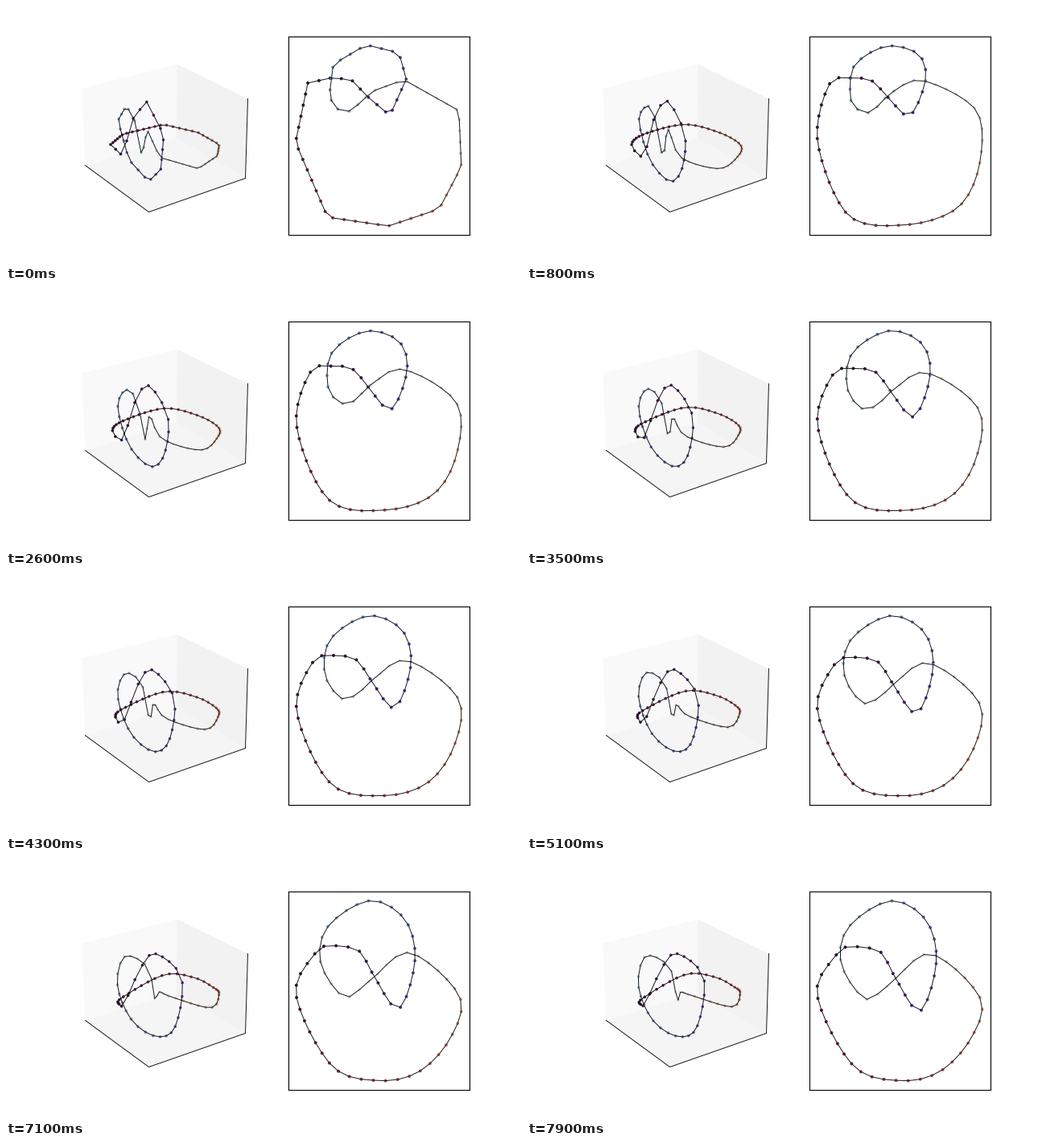
Recreate the animation shown at these times as a matplotlib script. Size 640 by 320 pixels, loop 8 s.

```python
import matplotlib.pyplot as plt
import numpy as np
from matplotlib.animation import FuncAnimation
from matplotlib.patches import Polygon

W, H, DPI = 640, 320, 100
FRAMES, STEP = 80, 100
N = 69  # knot vertices
PX = 72 / DPI
INK = "#1a1a1a"

# Key points of the knot: plan x, plan y, height on the box view
LOOSE = np.array([
    (376, 97, 172), (408, 90, 186), (430, 94, 140), (449, 114, 118),
    (476, 137, 160), (496, 92, 203), (487, 60, 218), (447, 50, 191),
    (407, 74, 142), (402, 114, 124), (411, 129, 138), (428, 132, 187),
    (455, 107, 153), (493, 93, 188), (560, 131, 202), (563, 200, 186),
    (536, 252, 172), (474, 273, 157), (400, 262, 147), (361, 170, 159),
], float)
ROUND = np.array([
    (385, 117, 178), (402, 107, 176), (440, 113, 130), (457, 141, 115),
    (490, 187, 145), (511, 126, 206), (498, 74, 218), (454, 50, 198),
    (401, 82, 155), (391, 127, 118), (420, 171, 132), (444, 160, 173),
    (460, 146, 163), (505, 116, 167), (566, 170, 181), (555, 220, 164),
    (515, 262, 156), (464, 273, 144), (406, 254, 141), (361, 167, 170),
], float)


def trace(keys, smooth, steps=12):
    """Closed curve from straight (0) to Catmull-Rom (1) spans."""
    a, b, c, d = (np.roll(keys, s, axis=0)[:, None] for s in (1, 0, -1, -2))
    u = np.linspace(0, 1, steps, endpoint=False)[None, :, None]
    line = b + (c - b) * u
    curve = 0.5 * (2 * b + (c - a) * u + (2 * a - 5 * b + 4 * c - d) * u**2
                   + (3 * b - a - 3 * c + d) * u**3)
    return (line + (curve - line) * smooth).reshape(-1, 3)


def resample(path):
    """Vertices at equal distances along the plan, closed."""
    path = np.vstack([path, path[:1]])
    dist = np.r_[0, np.cumsum(np.hypot(*np.diff(path[:, :2], axis=0).T))]
    at = np.linspace(0, dist[-1], N + 1)
    return np.column_stack([np.interp(at, dist, col) for col in path.T])


def knot_at(t):
    smooth = 1 - np.exp(-t / 0.3)
    late = np.clip((t - 1.6) / 6.3, 0, 1)
    relax = 1 - (1 - late)**1.4
    return resample(trace(LOOSE + (ROUND - LOOSE) * relax, smooth))


def box_view(p):
    x, y, h = p.T
    return np.column_stack([197 + 0.533 * (x - 463.5) + 0.321 * (y - 162), h])


fig = plt.figure(figsize=(W / DPI, H / DPI), dpi=DPI, facecolor="white")
box = fig.add_axes([0, 0, 1, 1])
box.set(xlim=(-0.5, W - 0.5), ylim=(H - 0.5, -0.5))
box.axis("off")
plan = fig.add_subplot(122, xticks=[], yticks=[])

# Walls and floor of the 3D box
left_top, back_top, right_top = (94, 102), (212, 72), (300, 115)
left, back, right, front = (98, 198), (211, 164), (297, 214), (177, 256)
for face, grey in [((left_top, back_top, back, left), 0.975),
                   ((back_top, right_top, right, back), 0.95),
                   ((left, back, right, front), 0.9625)]:
    box.add_patch(Polygon(face, facecolor=str(grey), edgecolor="none"))
box.plot(*zip(left, front, right, right_top), color=INK, lw=PX)

colors = plt.get_cmap("twilight_shifted")(np.arange(N) / N)


def add_knot(ax, size):
    dots = ax.scatter(np.zeros(N), np.zeros(N), s=(size * PX)**2, c=colors,
                      linewidths=0, zorder=3)
    line, = ax.plot([], [], color=INK, lw=PX, zorder=4)
    return line, dots


box_knot, plan_knot = add_knot(box, 3.6), add_knot(plan, 4)


def place(knot, pts):
    line, dots = knot
    line.set_data(*pts.T)
    dots.set_offsets(pts[:-1])


def draw(i):
    p = knot_at(i * STEP / 1000)
    flat = p[:, :2]
    place(box_knot, box_view(p))
    place(plan_knot, flat)
    # Keep a 5 % margin around the plan
    lo, hi = flat.min(axis=0), flat.max(axis=0)
    pad = 0.05 * (hi - lo)
    (x0, y0), (x1, y1) = lo - pad, hi + pad
    plan.set(xlim=(x0, x1), ylim=(y1, y0))
    return box_knot + plan_knot


anim = FuncAnimation(fig, draw, frames=FRAMES, interval=STEP, repeat=True,
                     repeat_delay=0)
plt.show()
```
